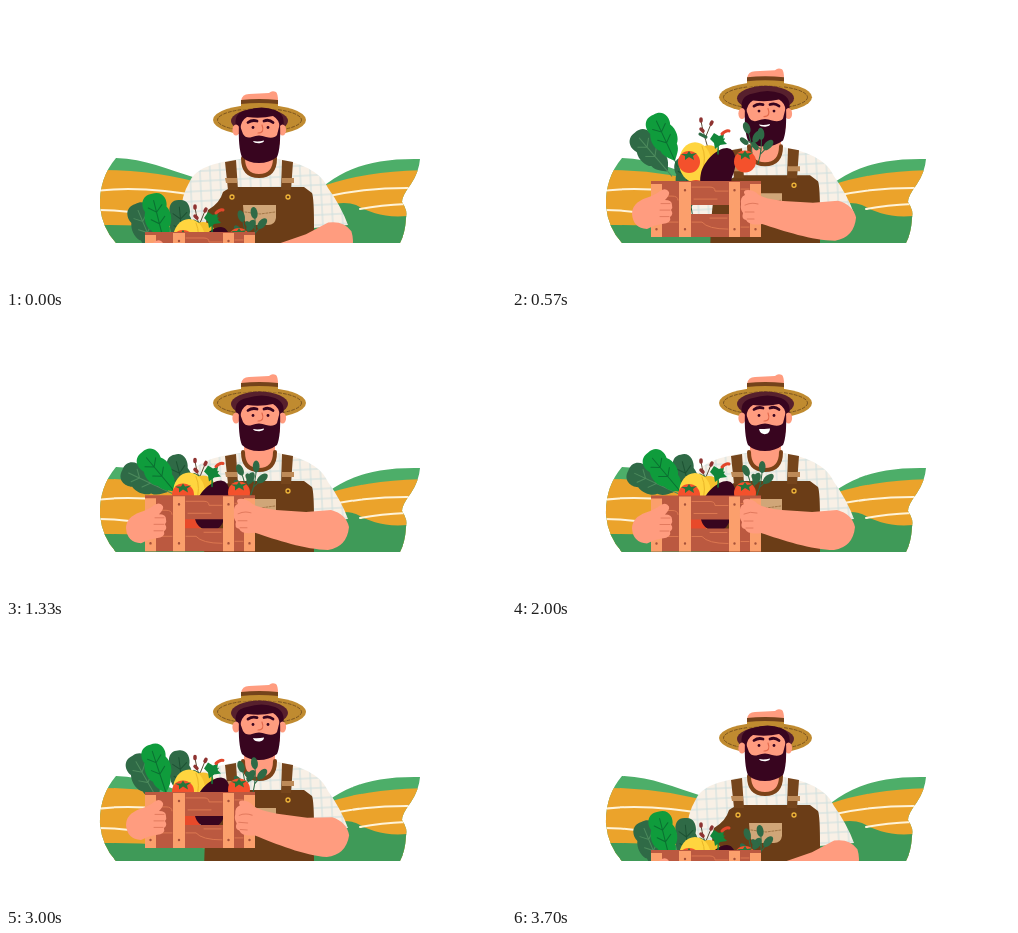
An HTML page that plays this animation: 500x281 px, repeating every 4.03 s.

```html
<!DOCTYPE html>
<html lang="en">
<head>
<meta charset="utf-8">
<title>Farmer with a crate of vegetables</title>
<style>
html, body { margin: 0; width: 100%; height: 100%; overflow: hidden; background: #fff; }
svg { display: block; width: 100%; height: 100%; }
.line { fill: none; stroke-linecap: round; }
.skin { fill: #ff9c7f; }
.dark { fill: #38051f; }
.gold { fill: #c08b30; }
.brown { fill: #6b3d17; }
.leafy { fill: #2f6a46; }
.post { fill: #fb9f6c; }
.crease { stroke: #e27a5e; }
</style>
</head>
<body>
<svg viewBox="0 0 500 281">
<defs>
  <clipPath id="stage"><path d="M0 0H500V237H0Z"/></clipPath>
  <clipPath id="hills">
    <path d="M110 152C140 153 160 163 190 172L215 182V237H110Q96 222 94 200Q93 172 110 152ZM300 196C330 165 360 152 414 153Q413 166 405 178Q396 190 396 196Q402 205 400 212Q399 228 394 237H300Z"/>
  </clipPath>
  <pattern id="plaid" width="10" height="10" patternUnits="userSpaceOnUse" patternTransform="rotate(-3)">
    <path d="M0 0H10V10H0Z" fill="#f8f0e6"/>
    <path d="M0 5H10M5 0V10" stroke="#cddfdf"/>
  </pattern>
  <path id="blade" d="M0-25C11-26 14-16 11-9C15-2 13 8 9 11C9 18 3 22 1 25H-1C-3 22-9 18-9 11C-13 8-15-2-11-9C-14-16-11-26 0-25Z"/>
  <path id="veins" class="line" d="M0-18V32M-7-12L0-6L7-12M-7 0L0 6L7 0"/>
  <g id="fruit">
    <circle r="11" fill="#f4512c"/>
    <path d="M0-11L2-8L8-9L4-6L5-2L0-5L-4-2L-4-6L-8-8L-2-8Z" fill="#25763b"/>
  </g>
  <g id="twig">
    <path class="line" d="M0 18Q2 2-2-12M1 8L7-1M1 4L-6-1" stroke="#2f6a46"/>
    <g class="leafy">
      <ellipse cx="-2" cy="-12" rx="3.4" ry="6" transform="rotate(-15 -2 -12)"/>
      <ellipse cx="7" cy="-2" rx="3.6" ry="6.5" transform="rotate(35 7 -2)"/>
      <ellipse cx="-6" cy="1" rx="2.6" ry="5" transform="rotate(-45 -6 1)"/>
    </g>
  </g>
</defs>
<g clip-path="url(#stage)">
  <g clip-path="url(#hills)">
    <path d="M90 150H420V240H90Z" fill="#4dae69"/>
    <path d="M90 164Q150 163 205 180L300 196L320 179Q360 165 420 164V240H90Z" fill="#eba32b"/>
    <path d="M90 219Q150 218 215 226V237H90ZM300 205Q335 193 350 199C365 207 378 212 402 210V237H300Z" fill="#3f9a58"/>
    <path class="line" d="M90 185Q135 179 200 191M90 204Q120 204 150 210M318 191Q360 181 410 182M354 203Q375 199 400 198" stroke="#fff3d8" stroke-width="2"/>
  </g>

  <g id="body">
    <path d="M234 153C205 157 190 163 184 175Q175 190 175 208L177 221H200V260H307V222L342 219Q335 200 322 182C316 168 300 158 272 153Z" fill="url(#plaid)"/>
    <path class="skin" d="M238 138H269V156Q267 169 253 169Q240 168 238 156Z"/>
    <path class="line" d="M237 152Q237 170 253 170Q269 170 269 152" stroke="#7b4218" stroke-width="4"/>
    <path class="brown" d="M229 181H298L306 187Q308 192 308 220V262H198Q199 215 202 204Q214 197 217 186Q222 182 229 181Z"/>
    <path d="M219 156L230 154L232 184H222ZM276 154L287 156L285 184H275Z" fill="#75451c"/>
    <path d="M219 172H231V177H220ZM276 172H288V177H276Z" fill="#bd8a58"/>
    <g class="line" stroke="#f0b63a" stroke-width="1.3"><circle cx="226" cy="191" r="2"/><circle cx="282" cy="191" r="2"/></g>
    <path d="M237 199H270V212Q269 219 262 219H245Q239 218 238 212Z" fill="#d0a678"/>
    <path class="line" d="M239 206L254 208L269 206" stroke="#a27748" stroke-dasharray="2 1.5"/>
  </g>

  <g id="hat">
    <ellipse class="gold" cx="253.5" cy="114" rx="46.5" ry="15.5"/>
    <ellipse class="line" cx="253.5" cy="114" rx="42" ry="11.5" stroke="#7b5420" stroke-dasharray="3 2"/>
    <ellipse cx="253.5" cy="115" rx="28.5" ry="12.5" fill="#57202d"/>
    <path class="gold" d="M235 104V95H272V104Q253 100 235 104Z"/>
    <path class="skin" d="M235 95Q236 88 243 88L263 87Q266 84 270 86Q272 88 272 95Z"/>
    <path d="M235 94Q253 92 272 94V98Q253 96 235 98Z" fill="#74431b"/>
  </g>

  <g id="head">
    <path class="dark" d="M230 122Q227 106 241 104Q256 99 269 104Q280 108 277 122Z"/>
    <g class="skin">
      <ellipse cx="230" cy="124" rx="3.6" ry="5.5"/>
      <ellipse cx="276.5" cy="124" rx="3.6" ry="5.5"/>
      <path d="M234 124Q235 114 241 111Q255 113 267 110Q273 113 274 122V137Q270 150 253 150Q236 150 234 136Z"/>
    </g>
    <path class="dark" d="M233 117L237 128Q240 133 246 131Q253 128 260 131Q268 133 271 129L274 117Q275 142 271 151Q263 157 253 157Q242 157 236 151Q232 142 233 117Z"/>
    <path class="line" d="M256 119Q259 127 252 127" stroke="#e2694c" stroke-width="1.2"/>
    <path id="brows" class="line" d="M242 116.5Q246 113.5 251 115M258 115Q263 113 267 116.5" stroke="#38051f" stroke-width="2.8"/>
    <g class="dark"><circle cx="247" cy="121.5" r="1.4"/><circle cx="262" cy="121.5" r="1.4"/></g>
    <path id="mouth" fill="#fff"/>
  </g>

  <g id="leaf3" class="leafy"><use href="#blade" transform="scale(.85 1)"/><use href="#veins" stroke="#1d5233"/></g>
  <g id="leaf1" class="leafy"><use href="#blade"/><use href="#veins" stroke="#4c8a5c"/></g>
  <g id="leaf2" fill="#0f9c3c"><use href="#blade"/><use href="#veins" stroke="#0a6f31"/></g>
  <g id="berries">
    <path class="line" d="M3 18Q-2 2-4-9M1 6L6-6" stroke="#5a4a35"/>
    <path class="line" d="M-4-9V-11M6-6L7-8M-2 1L-4-1" stroke="#8e3230" stroke-width="3.5"/>
    <path class="line" d="M1 7L-5 4" stroke="#2f6a46" stroke-width="3"/>
  </g>
  <use id="twig1" href="#twig"/>
  <use id="twig2" href="#twig"/>
  <g id="pepper">
    <ellipse cx="9" cy="1" rx="14" ry="18" fill="#f5c02d"/>
    <ellipse cx="-5" cy="0" rx="16" ry="20" fill="#ffd53f"/>
    <path class="line" d="M2-16Q7-5 2 10" stroke="#eab528"/>
  </g>
  <g id="eggplant">
    <circle cx="-22" cy="18" r="11" fill="#e84a2a"/>
    <path class="dark" d="M9-25C20-24 19-6 14 4C12 16 10 25-2 25C-15 25-20 13-17 0C-14-12-1-25 9-25Z"/>
  </g>
  <g id="herbs">
    <path class="line" d="M0 14Q1 2-3-4M0 6L6-1" stroke="#15803a" stroke-width="1.5"/>
    <path d="M-8-1L-4-7L1-4L6-6L5 0L9 4L2 5L-3 9L-4 3Z" fill="#12863a"/>
    <path class="line" d="M4-6Q8-10 11-9" stroke="#e2472b" stroke-width="3"/>
  </g>
  <use id="tomato1" href="#fruit"/>
  <use id="tomato2" href="#fruit"/>

  <g id="crate">
    <path d="M139 178H249V234H139ZM179 202V211H217V202Z" fill="#bb5940"/>
    <path class="line" d="M180 184H198Q203 184 203 188H216M151 193H160Q166 193 166 197M180 219H190Q196 226 216 226M151 219H166M182 196H205M198 215H215M229 186H237M229 224H237" stroke="#dc7750"/>
    <path class="post" d="M139 181H150V234H139ZM167 179H179V234H167ZM217 179H228V234H217ZM238 181H249V234H238Z"/>
    <path class="line" d="M173 187v.1M173 226v.1M222.5 187v.1M222.5 226v.1M144.5 226v.1M243.5 226v.1" stroke="#a5513a" stroke-width="2.4"/>
    <path class="skin" d="M120 211Q120 200 134 195Q143 192 148 188Q154 184 157 189Q158 192 153 197Q160 197 160 202Q161 205 159 207Q162 211 158 214Q160 220 150 221Q142 222 135 226Q121 225 120 211Z"/>
    <path class="line crease" d="M149 200.500H158M148 207H158M148 213.500H157"/>
  </g>
  <g id="arm">
    <path class="skin" d="M228 198Q227 191 232 189Q229 184 235 184Q241 184 246 189Q252 193 270 195L300 197L325 195Q340 199 343 212Q341 232 322 235C300 235 270 225 249 218Q236 220 233 214Q228 213 230 207Q227 203 228 198Z"/>
    <path class="line crease" d="M232 199Q238 196 245 198M232 206H241M234 213H241"/>
  </g>
</g>
</svg>
<script>
const LOOP = 4030, DROP = 55;

// How far each part of the farmer rises while the crate is held.
const lifts = { body: 15, head: 21, hat: 26 };

// Held place, tilt and toss height.
const veg = {
  leaf1: [139, 166, -65, 41], leaf2: [152, 157, -40, 48], leaf3: [175, 164, -15, 0],
  pepper: [188, 178, 0, 43], eggplant: [206, 191, 0, 46],
  tomato1: [177, 180, 0, 46], tomato2: [233, 178, 0, 44],
  herbs: [206, 158, 0, 46], berries: [193, 156, 0, 56],
  twig1: [238, 167, -10, 58], twig2: [249, 164, 15, 46]
};

const get = id => document.getElementById(id);
const place = (id, x, y, turn = 0, pivot = '') =>
  get(id).setAttribute('transform', `translate(${x} ${y}) rotate(${turn} ${pivot})`);

// Quick start, long soft landing: the curve of CSS "ease".
function ease(t, from, to) {
  const x = Math.min(1, Math.max(0, (t - from) / (to - from)));
  let low = 0, high = 1;
  for (let i = 0; i < 16; i++) {
    const s = (low + high) / 2;
    if (.75 * s * (1 - s) + s ** 3 < x) low = s; else high = s;
  }
  return .3 * low * (1 - low) ** 2 + 3 * low ** 2 * (1 - low) + low ** 3;
}

function draw(now) {
  const t = now % LOOP;
  const rise = ease(t, 340, 820), sink = ease(t, 3200, 3700);
  const up = rise - sink;
  const toss = rise - ease(t, 870, 1400);
  const bob = ease(t, 2670, 3200) - sink;
  const joy = ease(t, 1400, 2000) - .6 * ease(t, 2670, 3200) - .4 * sink;
  const fan = .35 + .65 * up - .3 * toss - .6 * bob;

  for (const id in lifts) place(id, 0, -lifts[id] * up - (id === 'hat' ? 3 * toss : 0));
  for (const id in veg) {
    const [x, y, tilt, height] = veg[id];
    place(id, x, y + DROP * (1 - up) - height * toss - 14 * bob, tilt * fan);
  }
  place('crate', 0, 48 - 45.5 * up - 19.5 * toss - 14 * bob);
  place('arm', 5 * (1 - up), 20 * (1 - up) - 6 * toss - 2 * bob, -23 * (1 - up) + 6 * toss + 4 * bob, '325 215');

  const chin = 138 + 4 * joy;
  get('mouth').setAttribute('d', `M247 135Q252 ${136 - joy} 258 134.5C258 ${chin} 248 ${chin} 247 135Z`);
  place('brows', 0, -joy);
  requestAnimationFrame(draw);
}
requestAnimationFrame(draw);
</script>
</body>
</html>
```
